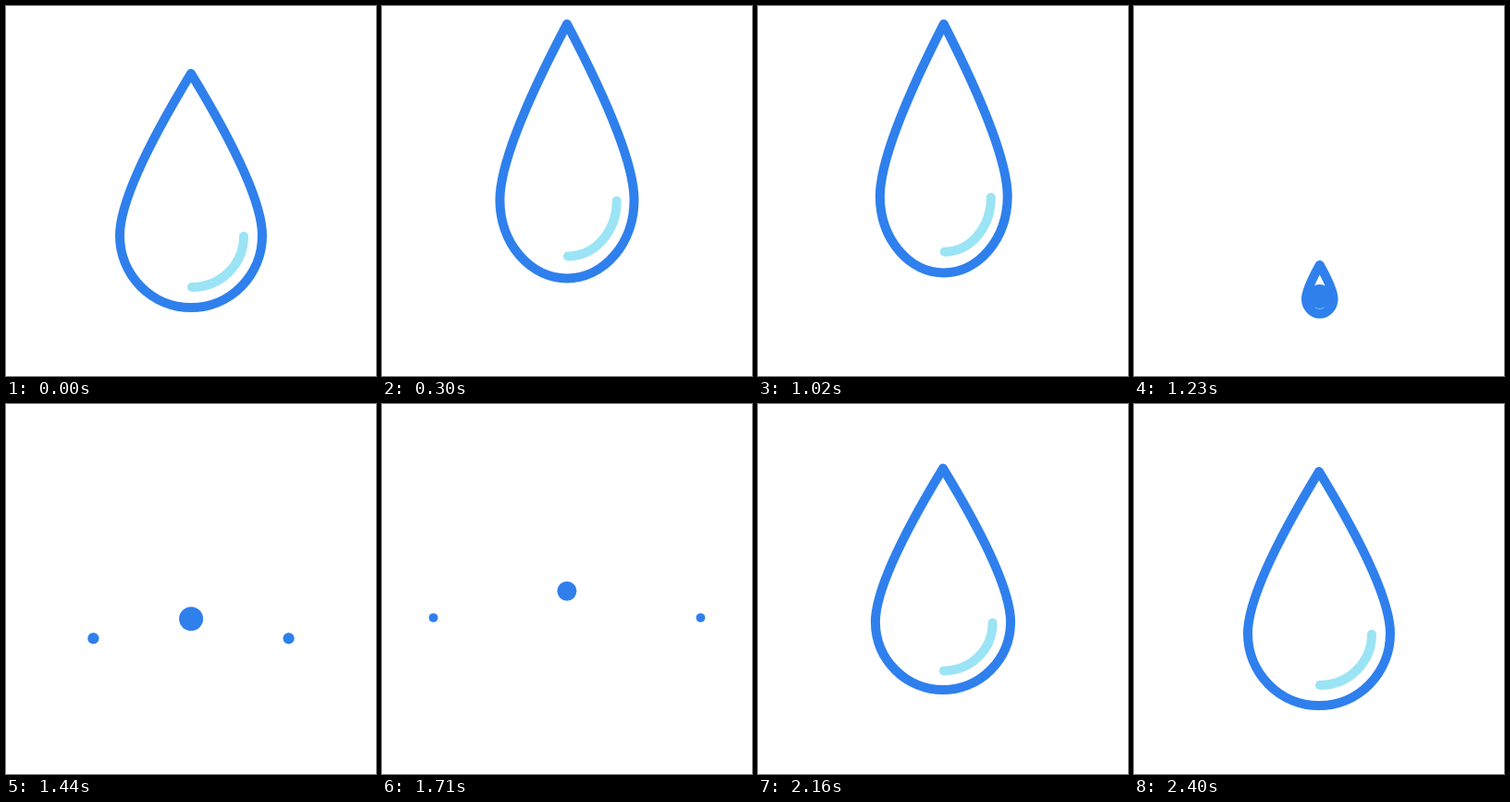
An HTML page that plays this animation: 400 px wide and 400 px high, repeating every 3.46 s.

```html
<!DOCTYPE html>
<html lang="en">
<head>
<meta charset="utf-8">
<title>Water drop</title>
<style>
  html, body { margin: 0; width: 100%; height: 100%; overflow: hidden; background: #fff; }
  svg { display: block; width: 100%; height: 100%; }
  path { fill: none; stroke-width: 10; stroke-linecap: round; stroke-linejoin: round; }
</style>
</head>
<body>
<svg viewBox="0 0 400 400">
  <g id="drop">
    <path id="shine" stroke="#9be4f5"/>
    <path id="outline" stroke="#2f80ed"/>
  </g>
  <g id="splash" fill="#2f80ed">
    <circle id="left"/>
    <circle id="right"/>
    <circle id="ball"/>
  </g>
</svg>
<script>
const LOOP = 3460, STEP = 30;
const RISE_END = 705, FALL_START = 806, FALL_TIME = 721;
const SPLASH_START = 1230, SPLASH_TIME = 600, DROP_GONE = 1275;
const GROW_START = 1740, GROW_END = 2400;

const [drop, shine, outline, splash, left, right, ball] =
  ["drop", "shine", "outline", "splash", "left", "right", "ball"].map(id => document.getElementById(id));

const clamp = u => Math.min(1, Math.max(0, u));
const mix = (a, b, u) => a + (b - a) * u;
const outCubic = u => 1 - (1 - u) ** 3;
const inOutQuint = u => u < 0.5 ? 16 * u ** 5 : 1 - 16 * (1 - u) ** 5;
const show = (el, on) => el.setAttribute("display", on ? "inline" : "none");

// Strokes keep their width, so the geometry is scaled rather than the group.
function drawDrop({ x, tip, sx, sy, inset = 1 }) {
  const cy = tip + 175 * sy;
  const at = (px, py) => `${(x + px * sx).toFixed(2)} ${(cy + py * sy).toFixed(2)}`;
  const radii = (rx, ry) => `${(rx * sx).toFixed(3)} ${(ry * sy).toFixed(3)}`;
  outline.setAttribute("d",
    `M${at(0, -175)} C${at(-31, -124)} ${at(-77, -42)} ${at(-77, 0)} ` +
    `A${radii(77, 78)} 0 0 0 ${at(77, 0)} ` +
    `C${at(77, -42)} ${at(31, -124)} ${at(0, -175)}Z`);
  const k = inset;
  shine.setAttribute("d",
    `M${at(57 * k, 1)} A${radii(56 * k, 55 * k)} 0 0 1 ${at(1, 56 * k)}`);
}

function dropPose(t) {
  if (t < RISE_END) {
    const p = outCubic(t / RISE_END);
    return { x: 200, tip: mix(73, 7, p), sx: mix(1, 0.929, p), sy: mix(1, 1.107, p) };
  }
  if (t < DROP_GONE) {
    const p = inOutQuint(clamp((t - FALL_START) / FALL_TIME));
    return { x: 200.8, tip: mix(7, 344, p), sx: mix(0.929, 0.02, p), sy: mix(1.107, 0, p) };
  }
  // Regrows out of a point at the top of the stage.
  const v = 1 - clamp((t - GROW_START) / (GROW_END - GROW_START));
  const s = 1 - 0.87 * (0.43 * v ** 2 + 0.57 * v ** 6);
  return { x: 200, tip: 5 + 68 * s, sx: s, sy: s, inset: 1 - 0.18 * (1 - s) };
}

function place(el, x, y, r) {
  el.setAttribute("cx", x.toFixed(2));
  el.setAttribute("cy", y.toFixed(2));
  el.setAttribute("r", r.toFixed(2));
}

function drawSplash(t) {
  const u = clamp((t - SPLASH_START) / SPLASH_TIME);
  const p = outCubic(u);
  const size = 1 - u ** 7.4;
  const reach = 145.6 * p;
  const sideY = mix(314, 230.4, p);
  place(ball, mix(200.7, 199.9, p), mix(314, 201.3, p), 13 * size);
  place(left, 200 - reach, sideY, 6.1 * size);
  place(right, 200 + reach, sideY, 6.1 * size);
}

function render(now) {
  const t = Math.floor((now % LOOP) / STEP) * STEP;
  const dropOn = t < DROP_GONE || t >= GROW_START;
  const splashOn = t >= SPLASH_START && t < SPLASH_START + SPLASH_TIME;
  show(drop, dropOn);
  show(splash, splashOn);
  if (dropOn) drawDrop(dropPose(t));
  if (splashOn) drawSplash(t);
}

const start = performance.now();
function tick() {
  render(performance.now() - start);
  requestAnimationFrame(tick);
}
tick();
</script>
</body>
</html>
```
